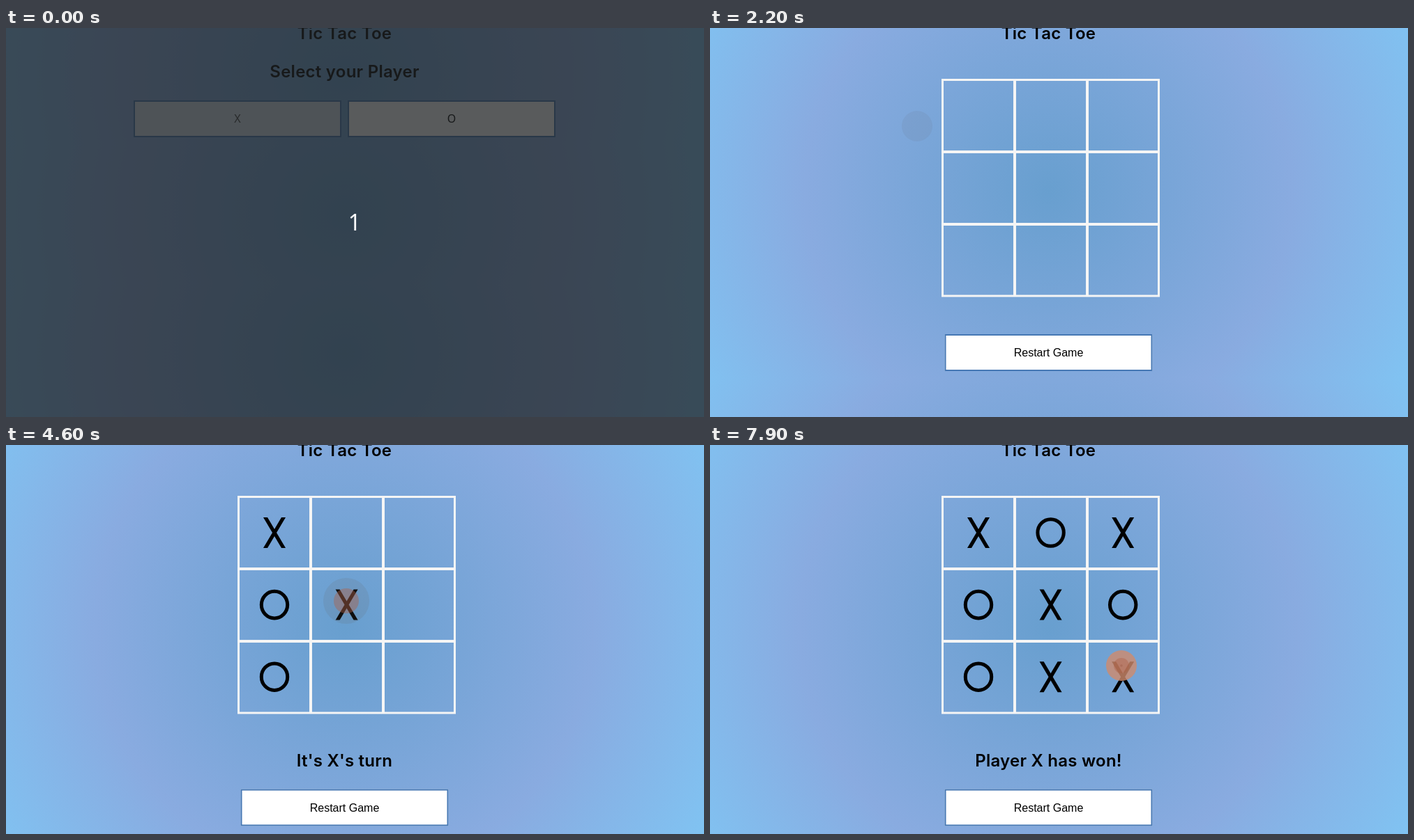
An HTML page with a canvas that plays this animation: 1001 px wide and 559 px high, repeating every 8 s.

```html
<!DOCTYPE html>
<html lang="en">
<head>
<meta charset="utf-8">
<title>Tic Tac Toe</title>
<style>
html, body { margin: 0; width: 100%; height: 100%; overflow: hidden; }
canvas { display: block; }
</style>
</head>
<body>
<canvas id="stage" width="1001" height="559"></canvas>
<script>
const ctx = document.getElementById('stage').getContext('2d');
const LOOP = 8000, STEP = 100, CENTER = 485.5;
const HEADING = '600 24px Inter, sans-serif';
const SANS = '16px "Noto Sans", sans-serif';
const ARIAL = '16px "Liberation Sans", Arial, sans-serif';

// Each tap places the listed marks: [symbol, column, row]
const taps = [
  { at: 1100, x: 297, y: 141, marks: [] },
  { at: 2580, x: 397, y: 131, marks: [['X', 0, 0], ['O', 0, 2]] },
  { at: 3700, x: 488, y: 224, marks: [['X', 1, 1], ['O', 0, 1]] },
  { at: 5060, x: 512, y: 316, marks: [['X', 1, 2], ['O', 1, 0]] },
  { at: 6400, x: 578, y: 150, marks: [['X', 2, 0], ['O', 2, 1]] },
  { at: 7600, x: 590, y: 317, marks: [['X', 2, 2]] }
];

// Tap animation curves as [age, value] points
const outerRadius = [[0, 9], [100, 11], [200, 16], [300, 22], [420, 31], [600, 39], [800, 37], [900, 33], [1000, 28], [1150, 19]];
const outerAlpha = [[0, .9], [200, .85], [300, .8], [420, .65], [600, .45], [900, .15], [1040, .22], [1150, 0]];
const middleRadius = [[0, 0], [200, 6], [300, 11], [420, 17], [600, 21], [900, 18], [1030, 0]];
const coreRadius = [[250, 0], [420, 6], [550, 9], [800, 0]];

function sample(points, t) {
  const i = points.findIndex(p => p[0] > t);
  if (i === 0) return points[0][1];
  if (i < 0) return points[points.length - 1][1];
  const [t0, a] = points[i - 1], [t1, b] = points[i];
  return a + (b - a) * (t - t0) / (t1 - t0);
}

function text(str, x, y, font, color = '#000', spacing = '0px') {
  ctx.font = font;
  ctx.letterSpacing = spacing;
  ctx.fillStyle = color;
  ctx.textAlign = 'center';
  ctx.fillText(str, x, y);
}

const heading = (str, y) => text(str, CENTER, y, HEADING, '#000', '0.25px');

function button(x, y, label, font, fill = '#fff', color = '#000') {
  ctx.fillStyle = fill;
  ctx.fillRect(x, y, 298, 53);
  ctx.strokeStyle = '#4678b4';
  ctx.lineWidth = 2;
  ctx.strokeRect(x + 1, y + 1, 296, 51);
  text(label, x + 149, y + 32, font, color);
}

// The page gradient repeats vertically with the page height
function background(height) {
  const radius = Math.hypot(516, height / 2);
  for (let top = -33; top < 559; top += height) {
    const cy = top + height / 2;
    const g = ctx.createRadialGradient(CENTER, cy, 0, CENTER, cy, radius);
    g.addColorStop(0, '#689fcf');
    g.addColorStop(.6, '#89abe0');
    g.addColorStop(1, '#80c3f2');
    ctx.fillStyle = g;
    ctx.fillRect(0, top, 1001, height);
  }
}

function grid() {
  ctx.strokeStyle = '#f5f5f5';
  ctx.lineWidth = 3;
  ctx.strokeRect(333.5, 74.5, 310, 310.5);
  ctx.fillStyle = '#f5f5f5';
  for (const i of [0, 1]) {
    ctx.fillRect(435 + i * 104, 74, 4, 311);
    ctx.fillRect(333, 176 + i * 104, 311, 4);
  }
}

function mark([symbol, col, row]) {
  const x = 385 + col * 103.6, y = 126 + row * 103.6;
  ctx.fillStyle = ctx.strokeStyle = '#000';
  ctx.lineWidth = 5;
  ctx.beginPath();
  if (symbol === 'O') {
    ctx.ellipse(x, y, 18.7, 19.3, 0, 0, Math.PI * 2);
    ctx.stroke();
    return;
  }
  for (const s of [-1, 1]) {
    ctx.moveTo(x + s * 16, y - 22);
    ctx.lineTo(x + s * 10, y - 22);
    ctx.lineTo(x - s * 16, y + 22);
    ctx.lineTo(x - s * 10, y + 22);
    ctx.closePath();
    ctx.fill();
    ctx.beginPath();
  }
}

function disc(x, y, r, color) {
  ctx.fillStyle = color;
  ctx.beginPath();
  ctx.arc(x, y, r, 0, Math.PI * 2);
  ctx.fill();
}

function ripple({ x, y }, age) {
  const grey = Math.min(1, Math.max(0, (age - 250) / 220));
  const rgb = [[240, 100], [150, 100], [110, 105]].map(([a, b]) => a + (b - a) * grey);
  disc(x, y, sample(outerRadius, age), `rgba(${rgb}, ${sample(outerAlpha, age)})`);
  disc(x, y, sample(middleRadius, age), 'rgba(175, 95, 70, .42)');
  disc(x, y, sample(coreRadius, age), 'rgba(150, 80, 60, .3)');
}

function chooser(t) {
  background(200);
  heading('Tic Tac Toe', 16);
  heading('Select your Player', 71);
  button(183, 104, 'X', SANS, '#d6e2ec', '#444');
  button(490, 104, 'O', SANS);
  if (t < 100) {
    ctx.fillStyle = 'rgba(32, 34, 36, .74)';
    ctx.fillRect(0, 0, 1001, 559);
    text('1', 500, 291, '32px "Noto Sans", sans-serif', '#fff');
  }
}

function game(marks) {
  const started = marks.length > 0;
  background(started ? 591 : 536);
  heading('Tic Tac Toe', 16);
  grid();
  marks.forEach(mark);
  if (started) heading(marks.length === 9 ? 'Player X has won!' : "It's X's turn", 462);
  button(336.5, started ? 494.5 : 440, 'Restart Game', ARIAL);
}

function draw(now) {
  const t = Math.floor(now % LOOP / STEP) * STEP;
  const done = taps.filter(tap => t >= tap.at + 100);
  if (done.length) game(done.flatMap(tap => tap.marks));
  else chooser(t);
  for (const tap of taps) {
    const age = t - tap.at;
    if (age >= 0 && age < 1150) ripple(tap, age);
  }
}

const start = performance.now();
function tick() {
  draw(performance.now() - start);
  requestAnimationFrame(tick);
}
tick();
</script>
</body>
</html>
```
